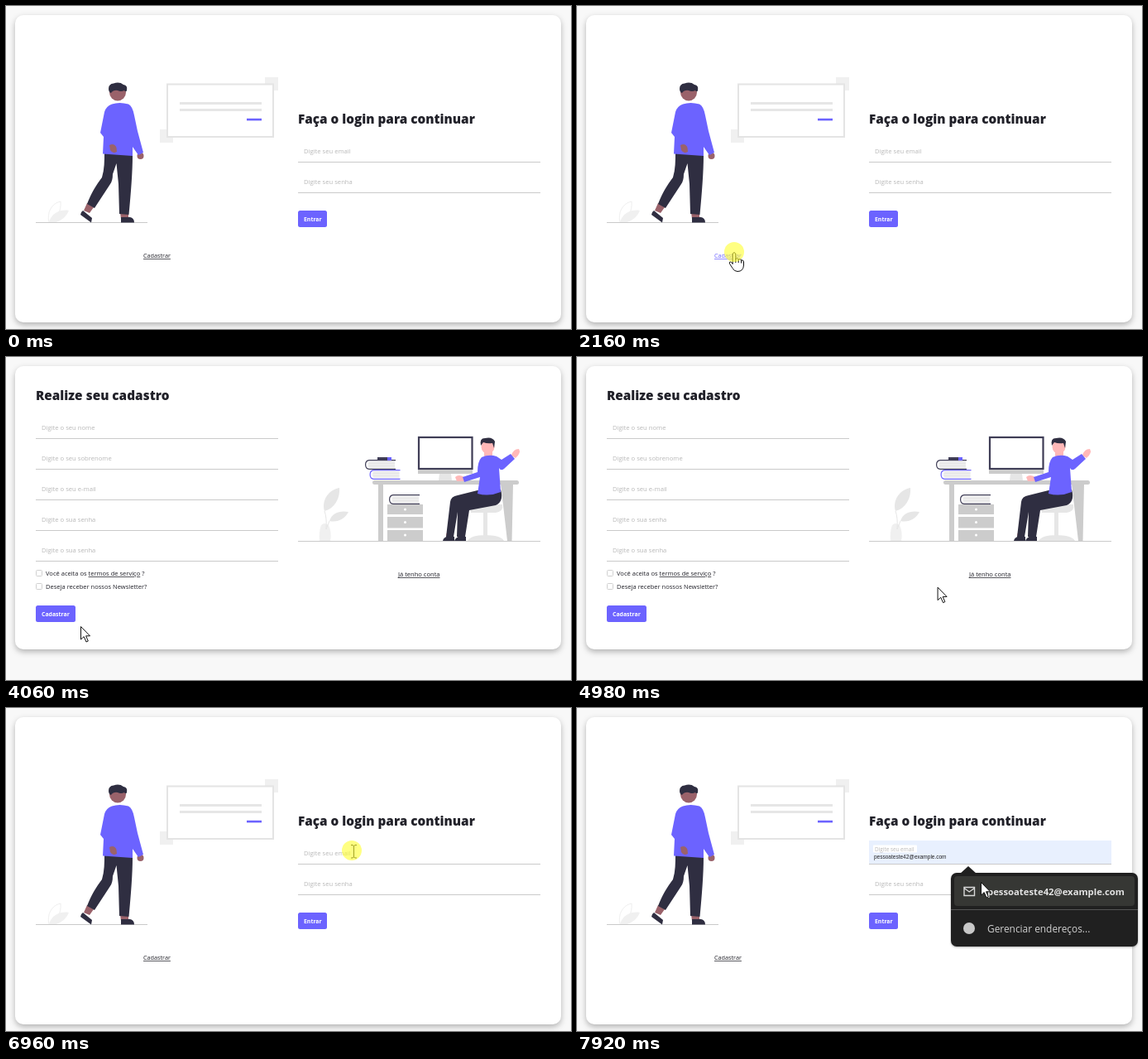
An HTML page for the animation above (7990 ms loop, 683 px wide and 390 px high).

```html
<!DOCTYPE html>
<html lang="pt-BR">
<head>
<meta charset="utf-8">
<title>Login e cadastro</title>
<style>
  html, body { margin: 0; width: 100%; height: 100%; overflow: hidden; background: #f8f8f8; }
  svg { display: block; width: 100%; height: 100%; font-family: "Open Sans", "Noto Sans", sans-serif; }
  .card { fill: #fff; filter: drop-shadow(0 3px 3.5px rgba(0, 0, 0, .28)); }
  .title { font-size: 15.32px; font-weight: 800; fill: #212129; }
  .hint { font-size: 7.65px; fill: #b8b8b8; }
  .body { font-size: 7.55px; fill: #212129; }
  .link { text-decoration: underline; }
  .button { fill: #6c63ff; }
  .button + text { font-size: 6.9px; font-weight: 700; fill: #fff; }
  .rule { stroke: #cacaca; }
  .violet { fill: #6c63ff; }
  .dark { fill: #2f2e41; }
  .skin { fill: #9a626a; }
  .pink { fill: #ffb8b8; }
  .pale { fill: #f0f0f0; }
  .light { fill: #e6e6e6; }
  .gray { fill: #ccc; }
  .pointer { fill: #fff; stroke: #111; stroke-linejoin: round; }
</style>
</head>
<body>
<svg viewBox="0 0 683 390">
  <g id="login">
    <rect class="card" x="11" y="11" width="660" height="371" rx="10"/>

    <path d="M52 261C49 250 55 238 66 236C67 248 62 256 52 261Z" fill="none" stroke="#efefef"/>
    <path class="pale" d="M52 261C55 250 66 245 76 247C72 257 62 263 52 261Z"/>
    <path class="rule" d="M36 261.5H171"/>

    <path class="pale" d="M313 86h16v16h-16zM186 149h16v16h-16z"/>
    <rect x="195" y="94.5" width="128" height="63.5" fill="#fff" stroke="#e4e4e4" stroke-width="2"/>
    <path class="light" d="M210 116h99v3h-99zM210 124h99v3h-99z"/>
    <path class="violet" d="M291 135.8h18v2.6h-18z"/>

    <path class="skin" d="M98 238L106 243L101 250L94 247ZM138 249H148V257H139Z"/>
    <circle class="skin" cx="162.500" cy="181" r="4"/>
    <path class="dark" d="M93 247L104 256L103 261.5L90 252Q90 249 93 247ZM139 255H150Q155 256 155 261.5H139Z"/>
    <path class="dark" d="M119 177L153 180C153 200 151 226 148.500 252L137 251L136 215L133.500 190L129 203Q129 211 126 215L107 244L98 239C103 226 109 216 116 207C119 197 119 187 119 177Z"/>
    <circle class="skin" cx="135" cy="104.500" r="10"/>
    <path class="violet" d="M128 118.500Q137 115.500 148 118.500Q153 121 155 132L159 151L166 177L160 180L153 170V181L117 178.500L118 158L114 153L119 128Q121 121 128 118.500Z"/>
    <path class="skin" d="M125 168Q131 165 133.500 171L134 176Q129 179 126 174Z"/>
    <path class="dark" d="M124 100Q124 94 130 93.500Q137 91 142 95Q147.500 96 146 102Q145 104.500 143 102Q139 104 135 102Q130 101 127 105Q124 104 124 100Z"/>
    <text class="body link" id="signUp" x="166" y="304" style="font-size:7.25px">Cadastrar</text>

    <text class="title" x="353" y="142">Faça o login para continuar</text>
    <rect id="fill" x="353" y="160" width="293" height="28" fill="#e8f0fe"/>
    <path class="rule" d="M353 188.500H646M353 225.500H646"/>
    <rect id="labelBack" x="358" y="165.500" width="53" height="9" rx="1" fill="#fff"/>
    <text class="hint" id="label" x="360" y="178">Digite seu email</text>
    <text id="preview" x="359" y="182" font-family="Liberation Sans, Arial, sans-serif" font-size="6.5" fill="#222">pessoateste42@example.com</text>
    <text class="hint" x="360" y="215">Digite seu senha</text>
    <rect class="button" x="353" y="247" width="35" height="20" rx="2.500"/>
    <text x="360" y="259.700">Entrar</text>

    <g id="dropdown">
      <path d="M463 200L473 191L483 200Z" fill="#202020"/>
      <rect x="452" y="199" width="226" height="89" rx="7" fill="#202020" style="filter:drop-shadow(0 1px 1px rgba(0,0,0,.3))"/>
      <rect id="row" x="456" y="203" width="218" height="36" rx="4" fill="#363734"/>
      <path d="M452 243.500H678" stroke="#555"/>
      <path d="M468 216.500H480.500V226.500H468ZM468 217.500L474.200 222L480.500 217.500" fill="none" stroke="#d8d8d8" stroke-width="1.400"/>
      <text x="496" y="226" font-size="11.300" font-weight="700" fill="#e3e3e3">pessoateste42@example.com</text>
      <circle cx="474" cy="266" r="7" fill="#c8c8c8"/>
      <text x="496" y="270.500" font-size="11.900" fill="#d0d0d0">Gerenciar endereços...</text>
    </g>
  </g>

  <g id="register">
    <rect class="card" x="11" y="11" width="660" height="342" rx="10"/>
    <text class="title" x="36" y="52">Realize seu cadastro</text>
    <g id="fields"></g>
    <g fill="#fff" stroke="#d0d0d0">
      <rect x="36.500" y="257.500" width="7" height="7" rx="1"/>
      <rect x="36.500" y="273.500" width="7" height="7" rx="1"/>
    </g>
    <text class="body" x="48" y="264">Você aceita os <tspan class="link">termos de serviço</tspan> ?</text>
    <text class="body" x="48" y="280">Deseja receber nossos Newsletter?</text>
    <rect class="button" x="36" y="300" width="48" height="20" rx="2.500"/>
    <text x="43" y="312.700">Cadastrar</text>

    <path class="pale" d="M381 203Q385 199 390 203Q394 212 392 222H379Q378 211 381 203Z"/>
    <path class="light" d="M385 186C381 172 391 160 403 158C404 171 397 183 385 186ZM391 198C394 188 404 185 414 187C409 196 401 200 391 198Z"/>
    <path d="M385 186Q388 194 387 208L391 198" fill="none" stroke="#e6e6e6"/>

    <path class="light" d="M560 178H600Q602 186 592 188H562ZM577 187H582V216H577ZM558 222Q562 215 579 215Q598 215 602 222Z"/>
    <path class="gray" d="M450 153H456V222H450ZM598 153H613L611.500 222H606ZM461 178H504V190H461ZM461 193H504V206.500H461ZM461 209H504V222H461Z"/>
    <rect class="gray" x="443" y="149" width="177" height="5" rx="2.500"/>
    <g fill="#fff">
      <circle cx="482.500" cy="184" r="1.500"/>
      <circle cx="482.500" cy="199.500" r="1.500"/>
      <circle cx="482.500" cy="215" r="1.500"/>
    </g>
    <g id="books"></g>
    <path d="M449 121H465V124H449Z" fill="#3f3d56"/>
    <path class="violet" d="M461 121H466V125H461Z"/>

    <path class="light" d="M524 141H538L539 149H523Z"/>
    <rect x="499" y="97" width="64.500" height="38" fill="#fff" stroke="#3f3d56" stroke-width="2.200"/>
    <path class="gray" d="M498 136H564V141H498Z"/>

    <path class="pink" d="M532 213H540V219H532ZM546 213H554V219H546ZM543 145Q547 141 554 145V150H545ZM611 119Q613 111 620 111Q623 116 616 122ZM578 113H588V121H578Z"/>
    <path class="dark" d="M528 222Q529 217 535 216.500L542 217V222ZM542 222Q544 217 549 216.500L556 217V222Z"/>
    <path class="dark" d="M570 161L598 160Q602 175 592 179L560 185L555 217H545L546 187L541 217H532L537 175Q538 168 546 167Z"/>
    <path class="violet" d="M575 121Q584 117 593 120L599 124L610 117L615 123L602 135Q598 138 596 134L598 163Q584 169 570 165L573 145L554 151L552 145L570 139Q570 126 575 121Z"/>
    <circle class="pink" cx="582.500" cy="108.500" r="8"/>
    <path class="dark" d="M574 107Q572 98 579 98Q588 96 591 102L590 110L588 104Q582 105 577 103Z"/>
    <path class="rule" d="M353 222.500H646"/>
    <text class="body link" id="signIn" x="474" y="265">Já tenho conta</text>
  </g>

  <g id="cursor">
    <path id="arrow" class="pointer" d="M.5 .5V16L4.200 12.600L7 19L9.300 18L6.600 11.800H11.500Z"/>
    <g id="hand" class="pointer">
      <path d="M-1.800 2Q0 -1 1.800 2V8.500Q4 6.500 5.200 9Q7.500 7.500 8.500 10Q11 9 11.500 12V16Q11 23.500 4 23.500Q0 23.500 -2 19.500L-5.300 14.500Q-6.500 11 -3.500 12.300L-1.800 14.500Z"/>
      <path d="M1.800 8V13M5.200 9V13M8.500 10V13.500" fill="none"/>
    </g>
    <path id="beam" d="M-3 -7.500H-1L.5 -6.500L2 -7.500H4M.5 -6.500V7M-3 8H-1L.5 7L2 8H4" fill="none" stroke="#222"/>
  </g>
  <circle id="click" r="12" fill="#ffff28"/>
</svg>
<script>
  const LOOP = 7990;
  const $ = id => document.getElementById(id);
  const show = (id, on) => $(id).setAttribute("display", on ? "inline" : "none");
  const clamp = v => Math.min(1, Math.max(0, v));

  $("fields").innerHTML = ["o seu nome", "o seu sobrenome", "o seu e-mail", "o sua senha", "o sua senha"]
    .map((what, i) => `<text class="hint" x="43" y="${88 + 37 * i}">Digite ${what}</text>
      <path class="rule" d="M36 ${98.5 + 37 * i}H329"/>`).join("");

  const book = (x, y, color) => `<g transform="translate(${x} ${y})">
    <path d="M37 .6H5Q.6 1 .6 6Q.6 11 5 11.400H37" fill="#fff" stroke="${color}" stroke-width="1.200"/>
    <path d="M5 2H36V10H5Q2 6 5 2Z" fill="#eee"/>
    <path d="M4 4.500H36M4 7.500H36" stroke="#ddd" stroke-width=".5"/></g>`;
  $("books").innerHTML = book(434, 124, "#3f3d56") + book(439.5, 136, "#6c63ff") + book(463, 166, "#3f3d56");

  // Pointer moves: start, end, number of steps, destination
  const moves = [
    [1330, 1600, 6, 190, 297],
    [2300, 2730, 7, 203, 306],
    [2960, 3130, 4, 199, 323],
    [3620, 4060, 8, 90, 325],
    [4180, 4350, 4, 81, 320],
    [4420, 5100, 13, 491, 271],
    [5260, 5550, 6, 494, 259],
    [6520, 6840, 6, 420, 173],
    [7100, 7290, 4, 457, 196],
    [7360, 7650, 6, 474, 209],
    [7820, 7920, 3, 488, 210]
  ];
  const clicks = [[2160, 190, 297], [5710, 494, 259], [6900, 418, 172]];

  function pointerAt(t) {
    let x = 222, y = 396;
    for (const [start, end, steps, toX, toY] of moves) {
      if (t < start) break;
      const step = Math.floor((t - start) / (end - start) * (steps - 1) + 1e-6) + 1;
      const p = clamp(step / steps);
      const eased = p * p * (3 - 2 * p);
      x += (toX - x) * eased;
      y += (toY - y) * eased;
    }
    return [x, y];
  }

  function pointerKind(t, y) {
    const overSignUp = t < 2600 && y < 308;
    const overSignIn = t >= 5260 && t < 5880 && y < 268;
    if (overSignUp || overSignIn) return "hand";
    const overField = y < 189 || (y > 198 && y < 226 && t < 7000);
    return t > 6520 && overField ? "beam" : "arrow";
  }

  function render(t) {
    const [x, y] = pointerAt(t);
    const kind = pointerKind(t, y);
    const registering = t >= 3230 && t < 6130;
    show("login", !registering);
    show("register", registering);

    $("cursor").setAttribute("transform", `translate(${x} ${y})`);
    show("cursor", t >= 1330);
    for (const id of ["arrow", "hand", "beam"]) show(id, id === kind);

    const linkColor = active => active ? "#6c63ff" : "#212129";
    $("signUp").style.fill = linkColor(t < 3230 && (y < 308 || t >= 2160));
    $("signIn").style.fill = linkColor(t >= 5260 && y < 268);

    const click = clicks.find(([at]) => t >= at && t < at + 165);
    show("click", click);
    if (click) {
      $("click").setAttribute("cx", click[1]);
      $("click").setAttribute("cy", click[2]);
      $("click").setAttribute("opacity", .58 * clamp((165 - t + click[0]) / 65));
    }

    const float = clamp((t - 7030) / 150);
    $("label").setAttribute("y", 178 - 5.5 * float);
    $("label").style.fontSize = 7.65 - 1.25 * float + "px";
    const hovered = t >= 7360 && y > 202;
    show("dropdown", t >= 7100);
    for (const id of ["row", "fill", "preview"]) show(id, hovered);
    show("labelBack", float === 1);
  }

  function frame() {
    render(performance.now() % LOOP);
    requestAnimationFrame(frame);
  }
  frame();
</script>
</body>
</html>
```
